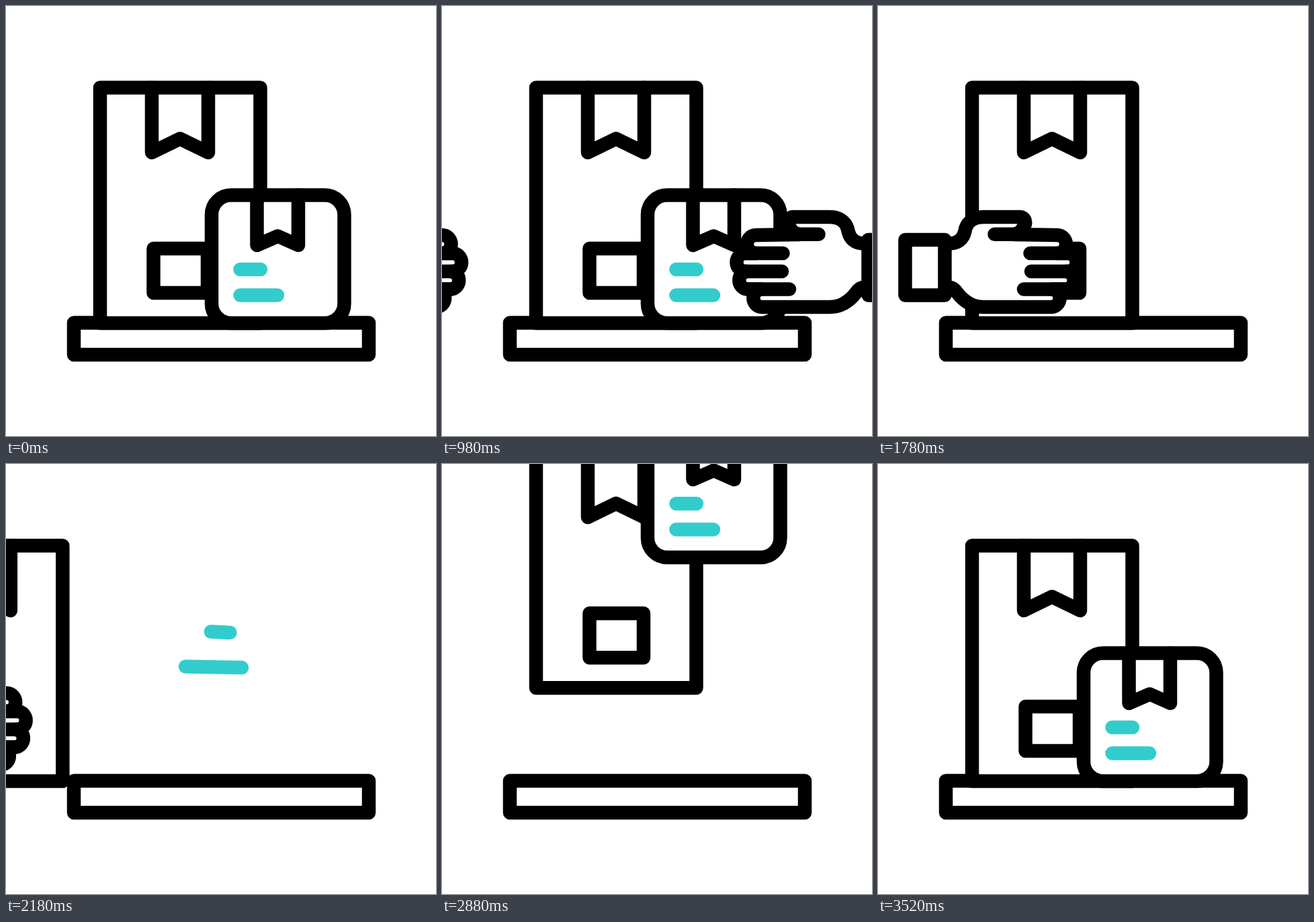
Animation, 640 px wide and 640 px high, one loop 3.6 s. Source, as an HTML page with a canvas:

```html
<!DOCTYPE html>
<html lang="en">
<head>
<meta charset="utf-8">
<title>Parcels on a platform</title>
<style>
  html, body { margin: 0; width: 100%; height: 100%; overflow: hidden; background: #fff; }
  canvas { display: block; width: 100vmin; height: 100vmin; }
</style>
</head>
<body>
<canvas id="stage" width="640" height="640"></canvas>
<script>
const LOOP = 3600;
const STROKE = 20.5;
const TEAL = '#33cccc';
const ctx = document.getElementById('stage').getContext('2d');

const clamp01 = v => Math.max(0, Math.min(1, v));

// Eased progress from 0 to 1 between two times
function ease(t, start, end) {
  const p = clamp01((t - start) / (end - start));
  return p * p * (3 - 2 * p);
}

function paint(path, color = '#000', fill = false) {
  if (fill) {
    ctx.fillStyle = '#fff';
    ctx.fill(path);
  }
  ctx.strokeStyle = color;
  ctx.stroke(path);
}

function box(left, top, right, bottom, radius = 0) {
  const path = new Path2D();
  if (radius) path.roundRect(left, top, right - left, bottom - top, radius);
  else path.rect(left, top, right - left, bottom - top);
  return path;
}

function at(x, y, draw) {
  ctx.save();
  ctx.translate(x, y);
  draw();
  ctx.restore();
}

const shapes = {
  platform: box(101, 471.5, 540, 519),
  tall: box(140, 121.5, 378.5, 472),
  tallRibbon: new Path2D('M217 121.5V218L259 197.5L301 218V121.5'),
  tallLabel: box(219.5, 361, 300, 427),
  small: box(306, 281.5, 503.5, 472, 29),
  smallRibbon: new Path2D('M373.5 281.5V356L404.5 342.5L435 356V281.5'),
  smallText: new Path2D('M348.5 392H379M348.5 430.5H404'),
  cuff: box(25.5, 348, 84.5, 430.5),
  hand: new Path2D(
    'M84.5 353.5H91C104 353.5 112 347 114.5 335C116 325 124 314 142 314' +
    'H196C204 314 207 323 201 330Q197 338 187 340L251.5 341' +
    'A13.5 13.5 0 0 1 251.5 368H267A13.5 13.5 0 0 1 267 395' +
    'H264.5A13.3 13.3 0 0 1 264.5 421.5H243.5A13.3 13.3 0 0 1 243.5 448' +
    'H142C122 448 110 436 103 427C99 421 95 419 92 419H84.5'),
  fingers: new Path2D('M158.5 339.8H190M211.5 368H267M213 395H267M202 421.5H264.5')
};

function drawTall() {
  paint(shapes.tall, '#000', true);
  paint(shapes.tallRibbon);
  paint(shapes.tallLabel);
}

function drawSmall() {
  paint(shapes.small, '#000', true);
  paint(shapes.smallRibbon);
  paint(shapes.smallText, TEAL);
}

function drawHand() {
  paint(shapes.hand, '#000', true);
  paint(shapes.fingers);
  paint(shapes.cuff, '#000', true);
}

// A streak that grows leftwards, then is drawn in from its right end
function drawStreak(t, start, x, y, length, slope) {
  const speed = 0.7;
  const head = Math.min(length, speed * (t - start));
  const tail = Math.max(0, speed * (t - start - 160));
  if (head <= 0 || tail >= length) return;
  const path = new Path2D();
  path.moveTo(x - head, y - head * slope);
  path.lineTo(x - tail, y - tail * slope);
  paint(path, TEAL);
}

function render(t) {
  const travel = 358;
  const dropHeight = 500;
  const dropping = t > 2400;

  const smallPull = travel * ease(t, 1159, 1729);
  const tallPull = -400 * ease(t, 1790, 2380);
  const rightHand = travel * (1 - ease(t, 343, 883)) + smallPull;
  const leftHand = 37 + travel * (ease(t, 818, 1395) - 1 - ease(t, 1674, 2382));
  const tallDrop = dropHeight * (ease(t, 2463, 3103) - 1);
  const smallDrop = dropHeight * (ease(t, 2633, 3273) - 1);

  ctx.fillStyle = '#fff';
  ctx.fillRect(0, 0, 640, 640);
  ctx.lineWidth = STROKE;
  ctx.lineCap = ctx.lineJoin = 'round';

  paint(shapes.platform);
  at(dropping ? 0 : tallPull, dropping ? tallDrop : 0, drawTall);
  if (!dropping) at(leftHand, 0, drawHand);
  at(dropping ? 0 : smallPull, dropping ? smallDrop : 0, drawSmall);
  if (t < 1800) {
    at(719 + rightHand, 0, () => {
      ctx.scale(-1, 1);
      drawHand();
    });
  }
  drawStreak(t, 2140, 333.5, 251, 70, 0.05);
  drawStreak(t, 2061, 351, 303, 110, 0.018);
}

function frame() {
  render(performance.now() % LOOP);
  requestAnimationFrame(frame);
}
frame();
</script>
</body>
</html>
```
